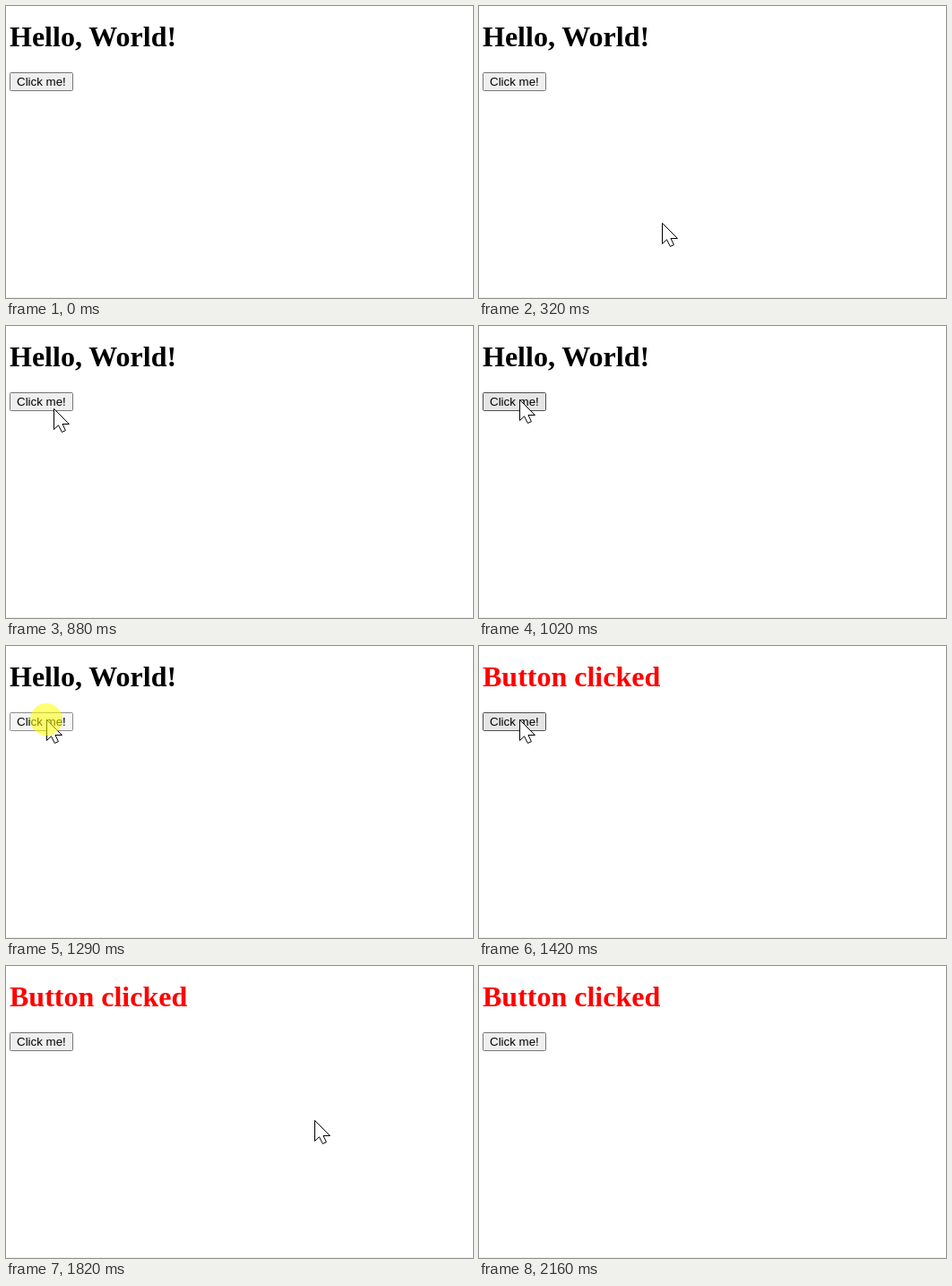
An HTML page that plays this animation: 521x326 px, repeating every 2640 ms.

```html
<!DOCTYPE html>
<html lang="en">
<head>
<meta charset="utf-8">
<title>Hello, World!</title>
<style>
  html, body { margin: 0; width: 100%; height: 100%; overflow: hidden; background: #fff; }
  svg { display: block; width: 521px; height: 326px; }
  .title { font: bold 32px "Liberation Serif", "Times New Roman", serif; }
  .label { font: 13.333px "Liberation Sans", Arial, sans-serif; }
  .hello, .clicked, .face, .ring, .cursor { animation: 2640ms step-end infinite; }
  .hello { animation-name: hello; }
  .clicked { fill: #f00; animation-name: clicked; }
  .face { fill: #efefef; stroke: #767676; animation-name: face; }
  .ring { fill: #ff0; fill-opacity: .55; animation-name: ring; }
  .cursor { animation-name: move; }

  @keyframes hello { 0% { opacity: 1 } 51.13%, 100% { opacity: 0 } }
  @keyframes clicked { 0% { opacity: 0 } 51.13%, 100% { opacity: 1 } }
  @keyframes ring { 0% { opacity: 0 } 48.86% { opacity: 1 } 53.78%, 100% { opacity: 0 } }
  @keyframes face {
    0% { fill: #efefef; stroke: #767676 }
    35.98% { fill: #e5e5e5; stroke: #4f4f4f }
    48.86% { fill: #f5f5f5; stroke: #8d8d8d }
    51.13% { fill: #e5e5e5; stroke: #4f4f4f }
    64.01%, 100% { fill: #efefef; stroke: #767676 }
  }
  @keyframes move {
    0% { transform: translate(-40px, -40px) }
    9.46% { transform: translate(313px, 305px) }
    12.12% { transform: translate(204px, 242px) }
    14.77% { transform: translate(163px, 214px) }
    17.42% { transform: translate(140px, 187px) }
    20.07% { transform: translate(125px, 166px) }
    22.72% { transform: translate(107px, 147px) }
    25.37% { transform: translate(88px, 128px) }
    28.03% { transform: translate(70px, 110px) }
    30.68% { transform: translate(61px, 101px) }
    33.33% { transform: translate(53px, 92px) }
    35.98% { transform: translate(48px, 86px) }
    38.63% { transform: translate(45px, 82px) }
    61.36% { transform: translate(70px, 92px) }
    64.01% { transform: translate(145px, 114px) }
    66.28% { transform: translate(250px, 142px) }
    68.93% { transform: translate(344px, 172px) }
    71.59% { transform: translate(405px, 201px) }
    74.24% { transform: translate(447px, 233px) }
    76.89% { transform: translate(480px, 271px) }
    79.16% { transform: translate(502px, 308px) }
    81.81%, 100% { transform: translate(-40px, -40px) }
  }
</style>
</head>
<body>
<svg viewBox="0 0 521 326">
  <path d="M0 325.5H520" stroke="#eee"/>
  <text class="title hello" x="4" y="45">Hello, World!</text>
  <text class="title clicked" x="4" y="45">Button clicked</text>
  <rect class="face" x="4.5" y="74.5" width="70" height="20" rx="1"/>
  <text class="label" x="12" y="89">Click me!</text>
  <path class="cursor" d="M.5 .4V23.5L5.5 18.8L9.4 26.5L13.4 24.6L10 17.5H17.4Z" fill="#fff" stroke="#000"/>
  <circle class="ring" cx="45" cy="82" r="18"/>
</svg>
</body>
</html>
```
